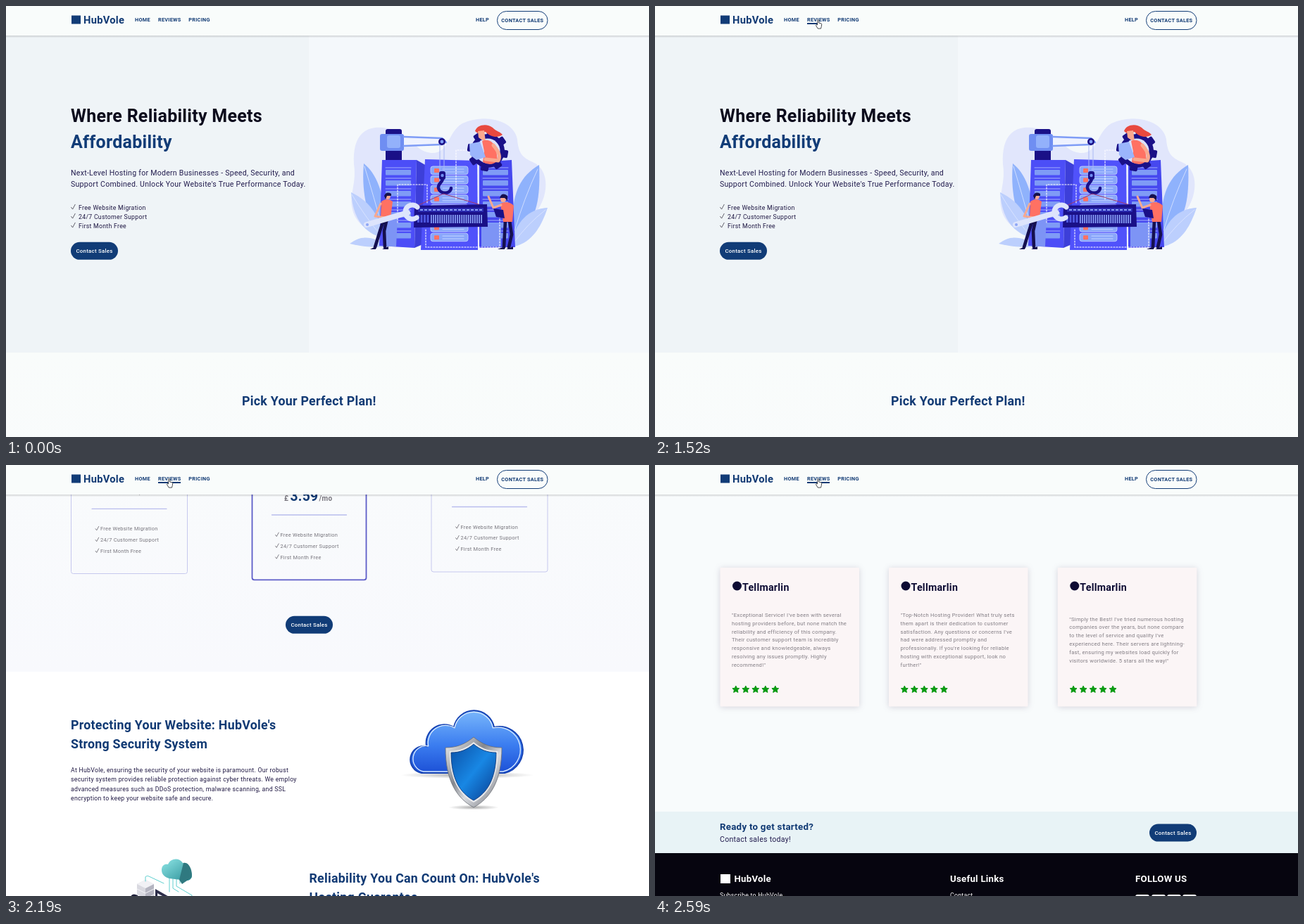
An HTML page that plays this animation: 913x613 px, repeating every 3.25 s.

```html
<!DOCTYPE html>
<html lang="en">
<head>
<meta charset="utf-8">
<title>HubVole hosting</title>
<style>
  html, body { margin: 0; width: 100%; height: 100%; overflow: hidden; background: #f9fbfb; }
  svg { position: absolute; left: 0; top: 0; width: 913px; height: 613px; overflow: hidden; }
  text { font-family: Roboto, sans-serif; letter-spacing: .27px; white-space: pre; }
  .h1 { font-size: 25px; font-weight: 700; }
  .h2 { font-size: 17.8px; font-weight: 700; fill: #113a74; }
  .brand { font-size: 14.7px; font-weight: 700; fill: #113a74; }
  .nav { font-size: 7.3px; font-weight: 700; fill: #113a74; }
  .lead { font-size: 10.55px; fill: #221c4e; }
  .body { font-size: 8.75px; fill: #211a45; }
  .feat { font-size: 7.4px; fill: #76747c; }
  .btn { font-size: 7.85px; font-weight: 500; fill: #fff; }
  .rate { font-size: 14.2px; font-weight: 700; fill: #0d0b33; }
  .quote { font-size: 7.62px; fill: #827d84; }
  .foot { font-size: 13.2px; font-weight: 700; fill: #fff; }
  .cta { font-size: 13.3px; font-weight: 700; fill: #113a74; }
  .price { font-size: 19.3px; font-weight: 700; fill: #113a74; }
  .unit { font-size: 10px; font-weight: 700; fill: #77757d; }
  .card { fill: #fbf5f6; filter: drop-shadow(0 1px 4px rgba(70, 50, 90, .2)); }
</style>
</head>
<body>
<svg viewBox="0 0 913 613">
  <defs>
    <linearGradient id="plansBg" x2="0" y2="1"><stop stop-color="#f9fcfb"/><stop offset="1" stop-color="#f8f9fd"/></linearGradient>
    <linearGradient id="sky" x2="0" y2="1"><stop stop-color="#79b7fb"/><stop offset=".55" stop-color="#3b7df0"/><stop offset="1" stop-color="#1c50d6"/></linearGradient>
    <linearGradient id="silver" x2="1" y2="1"><stop stop-color="#f2f3f5"/><stop offset=".4" stop-color="#85888f"/><stop offset=".6" stop-color="#d9dbdf"/><stop offset="1" stop-color="#6b6e76"/></linearGradient>
    <linearGradient id="deep" x2="1" y2="1"><stop stop-color="#0b4fa6"/><stop offset=".5" stop-color="#1887e4"/><stop offset="1" stop-color="#083b8e"/></linearGradient>
    <linearGradient id="teal" x2="1" y2="1"><stop stop-color="#8fe6e6"/><stop offset="1" stop-color="#2b8f97"/></linearGradient>
    <linearGradient id="drop" x2="0" y2="1"><stop stop-color="#000" stop-opacity=".15"/><stop offset="1" stop-color="#000" stop-opacity="0"/></linearGradient>
    <radialGradient id="soft"><stop stop-color="#555" stop-opacity=".5"/><stop offset="1" stop-color="#555" stop-opacity="0"/></radialGradient>
  </defs>
  <g id="page"></g>
  <g id="header"></g>
  <rect id="line" x="216" y="24" height="2" fill="#113a74"/>
  <path id="arrow" d="M0 0V9.6L2.2 7.8 3.7 11.2 5.3 10.5 3.8 7.2H6.6Z" fill="#fff" stroke="#33363b" stroke-width=".9"/>
  <path id="hand" d="M230.6 27V20.8q0-1.1 1-1.1t1 1.1V24l3.2.8q1 .3.9 1.4l-.5 3.3-.7 2.6h-4.3l-2.6-4.3q-.4-.9.4-1.2t1.6.4Z" fill="#fff" stroke="#33363b" stroke-width=".9"/>
</svg>
<script>
const $ = id => document.getElementById(id);
const NAVY = '#113c77';

const text = (x, y, cls, str, more = '') => `<text x="${x}" y="${y}" class="${cls}" ${more}>${str}</text>`;
const lines = (x, y, step, cls, rows) => rows.map((s, i) => text(x, y + i * step, cls, s)).join('');
const rect = (x, y, w, h, fill, r = 0, more = '') =>
  `<rect x="${x}" y="${y}" width="${w}" height="${h}" fill="${fill}" rx="${r}" ${more}/>`;
const path = (d, fill, more = '') => `<path d="${d}" fill="${fill}" ${more}/>`;
const stroke = (d, color, w = 1, more = '') =>
  `<path d="${d}" fill="none" stroke="${color}" stroke-width="${w}" stroke-linecap="round" stroke-linejoin="round" ${more}/>`;
const dot = (x, y, r, fill, more = '') => `<circle cx="${x}" cy="${y}" r="${r}" fill="${fill}" ${more}/>`;
const oval = (x, y, rx, ry, fill) => `<ellipse cx="${x}" cy="${y}" rx="${rx}" ry="${ry}" fill="${fill}"/>`;
const group = (x, y, inner) => `<g transform="translate(${x} ${y})">${inner}</g>`;
const repeat = (n, fn) => Array.from({ length: n }, (_, i) => fn(i)).join('');
const button = (x, y) => rect(x, y, 67, 25, NAVY, 12.5) + text(x + 7.4, y + 15.3, 'btn', 'Contact Sales');

const perks = ['Free Website Migration', '24/7 Customer Support', 'First Month Free'];
const perkList = (x, y, step, gap, cls, size, color) => lines(x + gap, y, step, cls, perks) +
  repeat(3, i => group(x + .6, y - size * .35 + i * step,
    stroke(`M0 0l${size * .22} ${size * .3} ${size * .4}-${size * .75}`, color, .9)));

function star(x, y, r) {
  const p = Array.from({ length: 10 }, (_, i) => {
    const a = (i / 5 - .5) * Math.PI, q = i % 2 ? r * .48 : r;
    return `${(x + q * Math.cos(a)).toFixed(1)} ${(y + q * Math.sin(a)).toFixed(1)}`;
  });
  return path(`M${p.join('L')}Z`, '#0a9a12', 'stroke="#0a9a12" stroke-linejoin="round"');
}

function server(x, y, w, rows) {
  return repeat(rows, i => rect(x, y + i * 15, w, 7.5, '#7f9bf6', 1) +
    stroke(`M${x} ${y - 3 + i * 15}h${w}`, '#b9c8fd', .8));
}

function crew() {
  const dark = '#1a1087', ink = '#15104f', coral = '#ff7163', skin = '#f9a98f';
  const gearTeeth = repeat(8, i => rect(-5.5, -29, 11, 9, dark, 2, `transform="rotate(${i * 45 + 10})"`));
  return path('M491 285C488 268 498 250 494 225C492 190 505 170 535 173C572 176 578 207 604 209C630 210 626 180 648 167C680 152 722 163 726 190C728 215 738 217 752 224C774 238 770 278 745 302L705 325H530C508 318 494 305 491 285Z', '#e1e6fc') +
    // leaves
    path('M508 224C525 238 538 262 540 325C515 315 504 270 508 224Z', '#8fb2fc') +
    path('M490 265C512 275 530 295 538 330C508 325 492 300 490 265Z', '#bccffd') +
    path('M488 338C505 325 520 327 545 342C520 344 505 342 488 338Z', '#bccffd') +
    path('M757 226C725 245 716 275 720 328C755 312 759 270 757 226Z', '#8fb2fc') +
    path('M769 287C740 288 722 310 716 343C745 340 760 315 769 287Z', '#bccffd') +
    stroke('M509 228Q522 270 536 322M491 268Q510 300 532 326M755 232Q735 275 722 320M766 290Q740 310 720 338', '#dfe8ff', .8) +
    // crane
    rect(539, 175, 23, 48, dark, 3) + rect(531, 182, 34, 24, '#6f8ef2', 3) + rect(541, 184, 19, 18, '#93b1fb', 3) +
    path('M565 186L619 188 625 194 619 198 565 199Z', '#eef2ff') +
    stroke('M565 186L619 188 625 194M565 199L619 197', '#7f9df6', 2.6) +
    // servers
    path('M534 219L583 219 580 344 530 341Z', '#4c4ef7') + path('M583 219L597 227 594 338 580 344Z', '#3d3fd9') +
    path('M595 218L669 220 670 347 589 347Z', '#5052fb') +
    path('M672 222L718 219 723 343 672 344Z', '#4648ef') +
    server(539, 233, 36, 7) + server(677, 233, 36, 7) +
    repeat(8, i => rect(603, 228 + i * 13.6, 53, 11.5, '#89a6fa', 3, 'stroke="#c9d5ff" stroke-width=".8"') +
      rect(608, 231 + i * 13.6, 7, 6, coral, 1) + stroke(`M620 ${232 + i * 13.6}h30m-30 4h30`, '#b9cbff', 1.2)) +
    path('M540 300H556L554 342H536ZM675 310H703V342H675Z', '#7d94f5') +
    // hoist
    stroke('M616 196V238M622 196V238', '#aab9f5', 1) + dot(619, 193, 5, dark) + dot(619, 193, 2.4, '#7f9df6') +
    rect(615, 235, 9, 12, dark, 3) + dot(619.5, 241, 2.2, '#6f8ef2') +
    stroke('M620 246C620 251 613 252 614 259C616 268 631 268 632 259', dark, 4.5) +
    stroke('M582 285L621 267 681 285', '#a33a68', 1) +
    path('M580 284L683 282 684 314 579 315Z', dark) + rect(585, 287, 93, 6, '#2a2bb0', 1) +
    repeat(15, i => rect(588 + i * 6, 289, 4, 2, '#8ba4fa')) + repeat(24, i => rect(603 + i * 3.1, 297, 1.7, 12, '#8ba4fa')) +
    repeat(4, i => rect(584 + i * 4.5, 297, 3, 11, '#4c55dd')) +
    stroke('M556 308V254H598V280M639 275V205H670M596 318V343H701V300', '#fff', 1.1, 'stroke-dasharray="2 2"') +
    // engineer in the gear
    group(684, 206, gearTeeth + dot(0, 0, 24, dark) + dot(0, 0, 17.5, '#dbe2fc')) +
    path('M666 178C668 169 683 166 691 173C697 179 701 178 705 183C699 188 688 187 681 179L670 181Z', '#e8493f') +
    path('M670 178L679 177 681 193 675 190 671 187Z', skin) +
    path('M676 192C686 188 693 194 696 204L698 220Q689 229 677 222L679 207Z', coral) +
    path('M658 196L673 193 681 215 668 219 659 212Z', '#9bb5fc') + stroke('M692 198Q704 212 699 220L681 218', skin, 5) +
    // workers
    stroke('M537 302L531 320 524 343M541 302L537 320 538 343', ink, 4.6) + path('M517 346h8v-4ZM534 346h9v-4Z', ink) +
    path('M533 278Q541 272 549 278L546 301H532Z', coral) + stroke('M532 281L524 299 538 301', skin, 3) +
    dot(542, 271, 3.8, skin) + path('M537 270Q540 263 547 267L547 270 541 270 539 275Z', ink) +
    stroke('M512 311L570 294', '#dde4fc', 8) + stroke('M584 286A10 10 0 1 0 583 301', '#dde4fc', 7) + dot(513, 311, 2, '#8da6f5') +
    stroke('M709 305L707 343M715 305L718 325 714 343', ink, 4.6) + path('M698 346h10v-4ZM710 346h10v-4Z', ink) +
    path('M702 281Q713 276 721 284L719 307H706Z', coral) + stroke('M703 283L692 287 685 271', skin, 3) +
    dot(706, 275, 3.9, skin) + path('M701 273Q704 264 712 270L712 277 708 273Z', ink) + path('M692 288L706 290 708 302 696 300Z', dark);
}

function cloudShield() {
  const cloud = 'M590 438A19 19 0 0 1 597 400A26 26 0 0 1 636 373A29 29 0 0 1 693 373A33 33 0 0 1 708 438Z';
  const shield = 'M0-50C-12-40-24-35-40-35C-40 12-24 37 0 50C24 37 40 12 40-35C24-35 12-40 0-50Z';
  return oval(655, 441, 95, 5, 'url(#soft)') + oval(664, 487, 36, 3.5, 'url(#soft)') +
    path(cloud, 'url(#sky)', 'stroke="#1744b4" stroke-width="2"') +
    `<g transform="translate(657 394) scale(.955) translate(-657 -394)">${stroke(cloud, '#d9ebff', 1.4)}</g>` +
    group(664, 437, path(shield, 'url(#silver)', 'stroke="#696c74" stroke-width=".8"') +
      `<g transform="scale(.86)">${path(shield, '#e8eaed')}</g><g transform="scale(.8)">${path(shield, 'url(#deep)', 'stroke="#062f73"')}</g>`);
}

function isoOffice() {
  const tower = (x, y, h) => path(`M${x} ${y}l12-6 12 6v${h}l-12 6-12-6Z`, '#d9d9e0') +
    path(`M${x + 12} ${y + 6}l12-6v${h}l-12 6Z`, '#b4b4c0') + path(`M${x} ${y}l12-6 12 6-12 6Z`, '#f1f1f5') +
    repeat(Math.floor(h / 8), i => stroke(`M${x} ${y + 7 + i * 8}l12 6 12-6`, '#f4f4f8', 1));
  return path('M128 208L210 168 283 207V213L210 256 128 215Z', '#d0d1d9') +
    path('M128 205L206 160 283 205 212 246Q208 248 204 246Z', '#f0f1f6', 'stroke="#a4a6b3" stroke-width=".8"') +
    path('M128 206L204 247Q208 249 212 247L283 206V212L210 251 128 212Z', '#a9abb9') +
    tower(186, 127, 47) + tower(253, 160, 42) +
    stroke('M198 123V117Q200 114 205 117L224 126M232 118V138M237 118V133L245 138M242 117V130L264 143V155M247 117V126', '#5ecfcf', 1) +
    path('M221 107C221 100 226 98 230 99C233 91 245 88 251 97C258 96 262 103 263 110C266 117 262 122 257 122L232 119C225 117 221 113 221 107Z', 'url(#teal)') +
    path('M252 97C261 95 266 112 263 118L250 127 246 121Z', '#2f7980') +
    path('M212 134L249 155V190L212 169Z', '#2c2d49') + path('M215 140L247 158V185L215 167Z', '#e9ebf2') +
    repeat(3, i => path(`M${217 + i * 10} ${144 + i * 5.6}l8 4.5v23l-8-4.5Z`, '#8c91a4') + dot(221 + i * 10, 153 + i * 5.6, 2.7, '#ef7a32')) +
    path('M193 187L213 178 244 193 225 204Z', '#cfd3df', 'stroke="#85899b" stroke-width=".7"') +
    // shield on its stand
    path('M139 195L155 186 170 194V198L154 206 139 199Z', '#c3c6d1') + path('M139 195L155 186 170 194 154 202Z', '#eceef4') +
    path('M144 166Q151 165 155 159Q158 163 164 164V178Q161 189 153 193Q144 186 144 166Z', '#2a8287') +
    path('M144 166Q151 165 155 159V192L153 193Q144 186 144 166Z', '#67c2c1') +
    // people
    stroke('M177 179L175 208M183 179L181 211', '#272943', 5) +
    path('M174 153Q181 149 189 154L191 166 188 181H174Z', '#f28322') +
    dot(182, 147, 4, '#f1a78c') + path('M177 145Q179 139 187 143L187 150 183 146Z', '#20213b') +
    path('M164 152L179 158V177L166 171Z', '#353756') + path('M167 156L177 160V172L168 168Z', '#e99a75') +
    path('M203 196Q210 189 217 196L220 213 202 217Z', '#2e8a8b') + stroke('M217 198L226 206 234 201', '#efad95', 2.4) +
    path('M204 188Q205 181 212 182Q217 184 216 191L211 201 205 196Z', '#20213b') +
    stroke('M206 216L224 214 221 231M205 218L214 223 206 232', '#272943', 5.5);
}

function plan(x, top, w, bottom, rule, name, price, main) {
  const border = main ? 'stroke="#5d5dc8" stroke-width="1.8"' : 'stroke="#c6c8ee"';
  const mid = x + w / 2;
  return rect(x, top, w, bottom - top, 'none', 3, border) +
    text(mid, top + 42, 'cta', name, 'text-anchor="middle"') +
    text(mid - 35.5, rule - 20, 'unit', '£') + text(mid - 27, rule - 20, 'price', price) + text(mid + 14, rule - 20, 'unit', '/mo') +
    stroke(`M${mid - 53} ${rule}h106`, '#b9bdee', 1.3) + perkList(mid - 48.5, rule + 31, 15.8, 7.5, 'feat', 7.4, '#76747c');
}

function review(x, y, rows) {
  return `<rect class="card" x="${x}" y="1666" width="197.5" height="197.5" rx="1"/>` +
    dot(x + 24, 1692, 6.5, '#0d0b33') + text(x + 31.5, 1699, 'rate', 'Tellmarlin') +
    lines(x + 16.5, y, 11.85, 'quote', rows) + repeat(5, i => star(x + 22.3 + i * 14, 1839.3, 5.2));
}

$('header').innerHTML = rect(0, 42, 913, 3.5, 'url(#drop)') + rect(0, 0, 913, 42, '#f9fcfb') +
  rect(93, 13.5, 13, 12, NAVY) + text(110, 25, 'brand', 'HubVole') +
  text(183, 22, 'nav', 'HOME') + text(216, 22, 'nav', 'REVIEWS') + text(259.3, 22, 'nav', 'PRICING') + text(667, 22, 'nav', 'HELP') +
  rect(697.5, 7.5, 71.5, 26, 'none', 13, `stroke="${NAVY}"`) + text(703.3, 23.1, 'nav', 'CONTACT SALES');

$('page').innerHTML =
  rect(0, 0, 430.5, 493, '#eff4f7') + rect(430.5, 0, 482.5, 493, '#f4f8fb') +
  text(92, 164.8, 'h1', 'Where Reliability Meets', 'fill="#0b0a1c"') + text(92, 202.3, 'h1', 'Affordability', `fill="${NAVY}"`) +
  lines(92, 240.8, 16.2, 'lead', ['Next-Level Hosting for Modern Businesses - Speed, Security, and', "Support Combined. Unlock Your Website's True Performance Today."]) +
  perkList(92, 289.5, 13, 11, 'body', 9, '#55535f') + button(92, 335.8) + crew() +

  rect(0, 493, 913, 528, 'url(#plansBg)') + text(335, 568, 'h2', 'Pick Your Perfect Plan!') +
  plan(92.5, 670, 165, 881.5, 789.3, 'Basic', '1.99') +
  plan(349.5, 662, 162, 890.3, 798, 'Standard', '3.59', true) +
  plan(604, 670, 165, 879, 786.5, 'Premium', '5.99') + button(397, 941.8) +

  rect(0, 1021, 913, 496, '#fff') +
  lines(92, 1103, 27.2, 'h2', ["Protecting Your Website: HubVole's", 'Strong Security System']) +
  lines(92, 1163.8, 13.55, 'body', [
    'At HubVole, ensuring the security of your website is paramount. Our robust',
    'security system provides reliable protection against cyber threats. We employ',
    'advanced measures such as DDoS protection, malware scanning, and SSL',
    'encryption to keep your website safe and secure.']) +
  group(0, 727, cloudShield()) + group(0, 1196, isoOffice()) +
  lines(430.5, 1321, 27.2, 'h2', ["Reliability You Can Count On: HubVole's", 'Hosting Guarantee']) +
  lines(430.5, 1382.2, 13.55, 'body', [
    "At HubVole, reliability is not just a promise; it's our commitment. With a steadfast",
    'infrastructure and meticulous attention to detail, we redefine hosting reliability to',
    'ensure your website is always online when it matters most. Experience the',
    'confidence of uninterrupted uptime and seamless performance with HubVole as',
    'your hosting partner.']) +

  rect(0, 1517, 913, 496, '#f8fbfc') +
  review(92.5, 1735.8, ["\"Exceptional Service! I've been with several", 'hosting providers before, but none match the',
    'reliability and efficiency of this company.', 'Their customer support team is incredibly',
    'responsive and knowledgeable, always', 'resolving any issues promptly. Highly', 'recommend!"']) +
  review(332, 1735.8, ['"Top-Notch Hosting Provider! What truly sets', 'them apart is their dedication to customer',
    "satisfaction. Any questions or concerns I've", 'had were addressed promptly and',
    "professionally. If you're looking for reliable", 'hosting with exceptional support, look no', 'further!"']) +
  review(571.8, 1741.5, ["\"Simply the Best! I've tried numerous hosting", 'companies over the years, but none compare',
    "to the level of service and quality I've", 'experienced here. Their servers are lightning-',
    'fast, ensuring my websites load quickly for', 'visitors worldwide. 5 stars all the way!"']) +

  rect(0, 2013, 913, 59, '#e8f3f6') + text(92, 2039, 'cta', 'Ready to get started?') +
  text(92, 2056, 'lead', 'Contact sales today!') + button(702, 2030.6) +
  rect(0, 2072, 913, 90, '#06050f') + rect(93, 2102, 14, 13, '#fff') +
  text(112.5, 2113.2, 'foot', 'HubVole') + text(419, 2113.2, 'foot', 'Useful Links') + text(682, 2113.2, 'foot', 'FOLLOW US') +
  text(92, 2135.3, 'body', 'Subscribe to HubVole', 'style="fill:#fff"') + text(419, 2135.3, 'body', 'Contact', 'style="fill:#fff"') +
  [682, 705, 727, 749].map(x => rect(x, 2131, 20, 20, '#fff', 3)).join('');

const LOOP = 3250, START = 255, TICK = 66.57;
const scroll = [0, 8, 44, 130, 280, 490, 727, 975, 1196, 1352, 1448, 1500, 1520]; // eased, one value per tick
const clamp = (v, lo, hi) => Math.min(hi, Math.max(lo, v));
const easeOut = (a, b, u, n) => b + (a - b) * (1 - u) ** n;

function cursorAt(k) {
  if (k <= 7) return [easeOut(841, 299, k / 7, 1.3), easeOut(580, 212, k / 7, 1)];
  const u = (k - 7) / 8;
  return [easeOut(299, 229.5, u, 4.5), easeOut(212, 30, u, 2.18)];
}

function draw(now) {
  const k = Math.floor((now % LOOP - START) / TICK);
  const show = (id, on) => $(id).setAttribute('visibility', on ? 'visible' : 'hidden');
  $('page').setAttribute('transform', `translate(0 ${-scroll[clamp(k - 23, 0, 12)]})`);
  $('line').setAttribute('width', 32 * clamp((k - 16) / 5, 0, 1));
  show('arrow', k >= 0 && k < 16);
  show('hand', k >= 16);
  if (k >= 0 && k < 16) $('arrow').setAttribute('transform', `translate(${cursorAt(k)})`);
}

const t0 = performance.now();
(function frame() {
  draw(performance.now() - t0);
  requestAnimationFrame(frame);
})();
</script>
</body>
</html>
```
